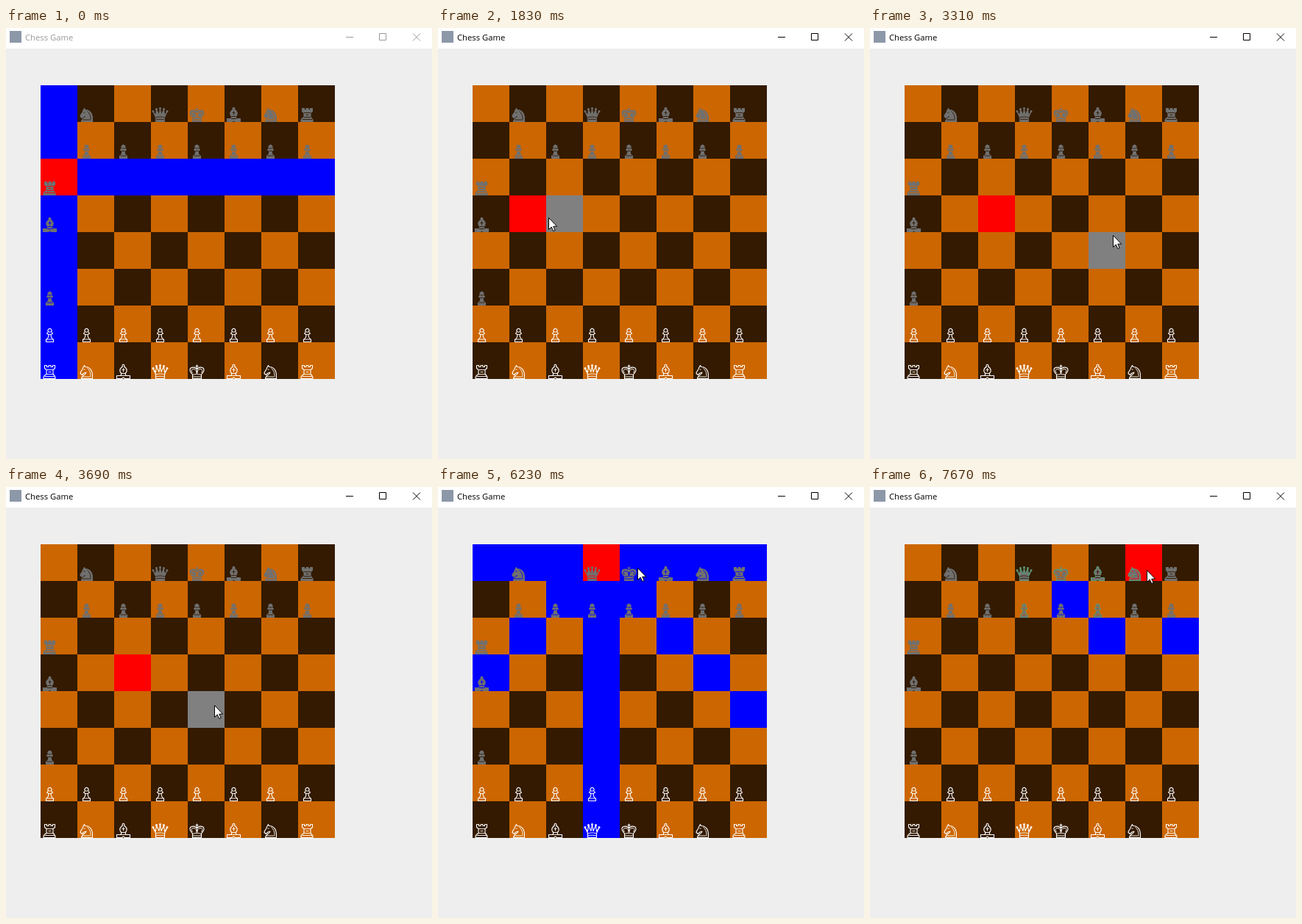
These frames come from a looping animation (579 px wide and 587 px high, 8000 ms). An HTML page:

```html
<!DOCTYPE html>
<html lang="en">
<head>
<meta charset="utf-8">
<title>Chess Game</title>
<style>
  html, body { margin: 0; width: 100%; height: 100%; overflow: hidden; background: #eee; }
  svg { display: block; width: 100%; height: 100%; }
  .bar { color: #999; }
  .bar.active { color: #000; }
  .bar text { font: 11.25px "Open Sans", "Noto Sans", sans-serif; fill: currentColor; }
  .bar path { fill: none; stroke: currentColor; }
  .cell rect { fill: var(--bg); }
  .white { --ink: #fff; --body: none; --mark: #fff; }
  .black { --ink: #707070; --body: #707070; --mark: var(--bg); }
  .black.tint { --ink: #5c9a78; }
  .body { fill: var(--body); stroke: var(--ink); stroke-width: 1.1; stroke-linejoin: round; }
  .mark { fill: none; stroke: var(--mark); stroke-width: .9; }
  .black .mark { stroke-opacity: .8; }
  .cursor { fill: #fff; stroke: #000; }
</style>
</head>
<body>
<svg viewBox="0 0 579 587">
  <defs>
    <g id="rook">
      <path class="body" d="M5.5 1.5h3v2h2.5v-2h3v2h2.5v-2h3v4l-2.5 2v6l2 2v1.5h1v2.5h-16v-2.5h1v-1.5l3-2v-6l-2.5-2z"/>
      <path class="mark" d="M8 7.5h9M8 13.5h9M6 16.5h13M10.5 10.5h4"/>
    </g>
    <g id="pawn">
      <path class="body" d="M10.5 5.5a2.5 2.5 0 1 1 4 0l2 2.5-2.5 1.5.5 3.5 2 3h1v3.5h-10v-3.5h1l2-3 .5-3.5-2.5-1.5z"/>
      <path class="mark" d="M10.5 6h4M10.5 9.5h4M8.5 16h8"/>
    </g>
    <g id="knight">
      <path class="body" d="M9.5 1.5l1 2c6 0 10 4.500 10 12v4H5.500c0-4.500 6-5 6.500-8.500l-3 1-2.500 2.500-2.500-2c0-3 3-4 3.500-7.500z"/>
      <path class="mark" d="M8.500 7h2M13.500 5.500c4 3 4.500 7 4.500 12M7 17h10"/>
    </g>
    <g id="bishop">
      <path class="body" d="M11.5 3a1.5 1.500 0 1 1 2 0c3 2 4.500 5 3 8l-1.500 1.500 1 3h5.500v4h-7l-2-1.500-2 1.500h-7v-4h5.500l1-3-1.500-1.500c-1.500-3 0-6 3-8z"/>
      <path class="mark" d="M12.500 5v5.500M10.500 7.500h4M9.500 12.500h6M9 15.500h7"/>
    </g>
    <g id="queen">
      <path class="body" d="M3 6l3.500 7.500v6h12v-6L22 6l-3.500 5-1-8-3.500 7.500L12.500 2 11 10.500 7.500 3l-1 8z"/>
      <g class="body">
        <circle cx="3" cy="5.500" r="1"/><circle cx="7.500" cy="2.500" r="1"/>
        <circle cx="12.500" cy="1.500" r="1"/>
        <circle cx="17.500" cy="2.500" r="1"/><circle cx="22" cy="5.500" r="1"/>
      </g>
      <path class="mark" d="M6.500 14c4-1.500 8-1.500 12 0M6.500 17c4-1 8-1 12 0"/>
    </g>
    <g id="king">
      <path class="body" d="M12.500 7c2-4 9.500-4 9.500 1 0 3-2.500 4-3.500 6v5.500h-12V14C5.500 12 3 11 3 8c0-5 7.500-5 9.500-1zM12.500 7V.5M10.500 2.500h4"/>
      <path class="mark" d="M12.500 7v6M6.500 12C4 9 5 6.500 8 6.500s4 3 4 5.500M18.500 12c2.500-3 1.500-5.500-1.500-5.500s-4 3-4 5.500M6.500 14.500c4-1.500 8-1.500 12 0M6.500 17h12"/>
    </g>
  </defs>
  <rect width="579" height="587" fill="#eee"/>
  <rect width="579" height="28" fill="#fff"/>
  <rect x="5" y="4" width="16" height="16" fill="#8c98a8"/>
  <g class="bar" id="bar">
    <text x="26" y="17">Chess Game</text>
    <path d="M462 12.500h10M507.500 7.500h9v9h-9zM553 7.500l10 10M563 7.500l-10 10"/>
  </g>
  <g id="board"></g>
  <path class="cursor" id="cursor" d="M.5.5v16l3.700-3.500 2.600 5.500 2.400-1-2.500-5.300h5z"/>
</svg>
<script>
const LOOP = 8000, SIZE = 50, LEFT = 47, TOP = 78;
const NS = 'http://www.w3.org/2000/svg';
const $ = id => document.getElementById(id);

// Upper case is white, lower case is black
const layout = [
  '.n.qkbnr', '.ppppppp', 'r.......', 'b.......',
  '........', 'p.......', 'PPPPPPPP', 'RNBQKBNR'
];
const names = { r: 'rook', n: 'knight', b: 'bishop', q: 'queen', k: 'king', p: 'pawn' };

// Squares that light up, by row and column distance from the chosen piece
const line = (r, c) => r === 0 || c === 0;
const reach = {
  r: line,
  q: (r, c) => line(r, c) || Math.abs(r) === Math.abs(c),
  k: (r, c) => Math.max(Math.abs(r), Math.abs(c)) === 1,
  n: (r, c) => Math.abs(r * c) === 2,
  p: (r, c) => r === 1 && Math.abs(c) <= 1
};

// [time, row, column]
const clicks = [
  [0, 2, 0], [1580, 3, 1], [2150, 3, 2], [4230, 1, 4],
  [5000, 1, 3], [5600, 0, 3], [6780, 0, 4], [7670, 0, 6]
];
const ACTIVE_AT = 1520, TINT_AT = 7670;

// Cursor runs: start, end, number of steps, points on the way
const runs = [
  [430, 430, 1, [355, 538]],
  [500, 970, 7, [215, 420], [107, 322]],
  [1040, 1190, 3, [131, 258]],
  [1270, 1370, 2, [131, 254]],
  [1750, 1980, 4, [168, 261]],
  [2300, 2470, 3, [172, 205]],
  [2620, 2760, 3, [270, 195], [430, 180], [546, 140]],
  [2840, 3390, 8, [520, 145], [430, 160], [350, 240], [310, 324]],
  [3460, 3690, 4, [283, 297]],
  [3770, 4080, 5, [205, 240], [172, 195], [258, 176]],
  [4540, 4770, 4, [213, 154]],
  [5060, 5240, 3, [214, 124]],
  [5390, 5390, 1, [214, 123]],
  [5840, 6230, 6, [271, 110]],
  [7010, 7520, 7, [318, 122], [354, 134], [376, 113]]
];

function along(points, f) {
  const s = f * (points.length - 1);
  const i = Math.min(Math.floor(s), points.length - 2);
  return points[i].map((v, k) => Math.round(v + (points[i + 1][k] - v) * (s - i)));
}

// Every cursor position in order of time
const track = [];
let last = runs[0][3];
for (const [start, end, steps, ...points] of runs) {
  for (let i = 0; i < steps; i++) {
    const time = Math.floor(start + (end - start) * i / Math.max(1, steps - 1));
    track.push({ time, pos: along([last, ...points], (i + 1) / steps) });
  }
  last = points[points.length - 1];
}

function make(tag, attrs, parent) {
  const el = document.createElementNS(NS, tag);
  for (const key in attrs) el.setAttribute(key, attrs[key]);
  return parent.appendChild(el);
}

const cells = [];
layout.forEach((row, r) => [...row].forEach((ch, c) => {
  const x = LEFT + c * SIZE, y = TOP + r * SIZE;
  const el = make('g', { class: 'cell', transform: `translate(${x} ${y})` }, $('board'));
  make('rect', { width: SIZE, height: SIZE }, el);
  const cell = { r, c, el };
  const kind = names[ch.toLowerCase()];
  if (kind) {
    const side = ch === ch.toLowerCase() ? 'black' : 'white';
    cell.piece = make('use', { href: '#' + kind, class: side, y: 30 }, el);
  }
  cells.push(cell);
}));

function stateAt(t) {
  const [since, row, col] = clicks.filter(k => k[0] <= t).pop();
  const rule = reach[layout[row][col]] || (() => false);
  const lit = (r, c) => rule(r - row, c - col);
  const past = track.filter(p => p.time <= t);

  // A hovered square keeps its grey until another one is entered
  let hover = null;
  for (const { pos: [x, y] } of past) {
    const r = Math.floor((y - TOP) / SIZE), c = Math.floor((x - LEFT) / SIZE);
    if (r >= 0 && r < 8 && c >= 0 && c < 8) hover = [r, c];
  }
  return { row, col, lit, hover, pos: past.length ? past[past.length - 1].pos : null };
}

function colour({ r, c }, s) {
  if (r === s.row && c === s.col) return '#f00';
  if (s.lit(r, c)) return '#00f';
  if (s.hover && r === s.hover[0] && c === s.hover[1]) return '#808080';
  return (r + c) % 2 ? '#331a00' : '#c60';
}

function draw(t) {
  const s = stateAt(t);
  $('bar').classList.toggle('active', t >= ACTIVE_AT);
  for (const cell of cells) {
    const { r, c, el, piece } = cell;
    el.style.setProperty('--bg', colour(cell, s));
    if (piece) {
      const near = r === 0 && c > 2 && c < 7 || r === 1 && (c === 3 || c === 5);
      piece.classList.toggle('tint', t >= TINT_AT && near);
    }
  }
  $('cursor').style.display = s.pos ? '' : 'none';
  if (s.pos) $('cursor').setAttribute('transform', `translate(${s.pos})`);
}

const begin = performance.now();
function tick() {
  draw((performance.now() - begin) % LOOP);
  requestAnimationFrame(tick);
}
tick();
</script>
</body>
</html>
```
